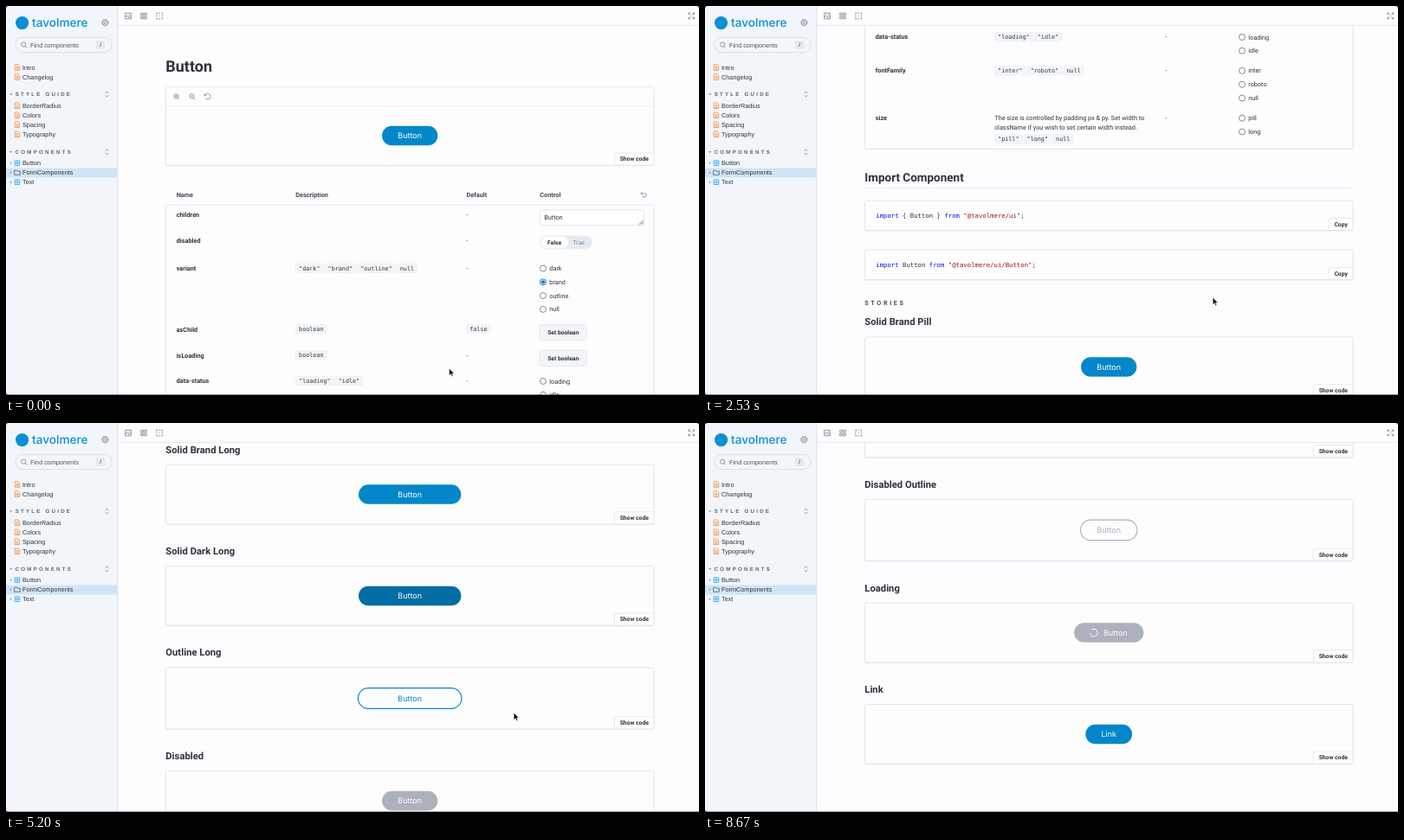
Recreate the animation shown at these times as an HTML page. Size 800 by 450 pixels, loop 8740 ms.

```html
<!DOCTYPE html>
<html lang="en">
<head>
<meta charset="utf-8">
<title>Component docs</title>
<style>
html, body { margin: 0; width: 100%; height: 100%; overflow: hidden; background: #fdfcfe; }
svg { display: block; width: 100vw; height: 100vh; text-rendering: geometricPrecision; }
text { white-space: pre; }
.r { font-family: Roboto, sans-serif; fill: #2e3438; }
.s { font-family: "Liberation Sans", Arial, sans-serif; fill: #2e3438; }
.m { font-family: "DejaVu Sans Mono", monospace; fill: #2e3438; }
.i { font-family: Inter, sans-serif; }
.b { font-weight: 700; }
.c { text-anchor: middle; }
.k { fill: #1010e8; }
.q { fill: #a31515; }
.ico { fill: none; stroke: #73828c; stroke-width: .8; }
</style>
</head>
<body>
<svg id="stage" viewBox="0 0 800 450" xmlns="http://www.w3.org/2000/svg">
  <g id="page"></g>
  <g id="frame"></g>
  <path id="cursor" d="M0 0V8.2L1.9 6.5L3.2 9.4L4.6 8.8L3.3 6H5.9Z" fill="#000" stroke="#fff" stroke-width=".6"/>
</svg>
<script>
const LOOP = 8740, STEPS = 131;
const BRAND = '#0487ca', DARK = '#026ea4', GREY = '#adb1bb';
const $ = id => document.getElementById(id);

// ---- drawing helpers: every text is placed by the middle of its capitals
const text = (x, cy, str, size, cls, extra = '') =>
  `<text x="${x}" y="${(cy + size * .355).toFixed(2)}" font-size="${size}" class="${cls}" ${extra}>${str}</text>`;
const rect = (x, y, w, h, fill, extra = '') =>
  `<rect x="${x}" y="${y}" width="${w}" height="${h}" fill="${fill}" ${extra}/>`;
const line = (x1, y1, x2, y2, color, w = .6) =>
  `<path d="M${x1} ${y1}L${x2} ${y2}" stroke="${color}" stroke-width="${w}"/>`;
const icon = (x, y, d, extra = '') =>
  `<path class="ico" transform="translate(${x} ${y})" d="${d}" ${extra}/>`;

const card = (y, h) =>
  rect(184.3, y + .9, 564, h, '#000', 'rx="2.2" opacity=".07"') +
  rect(184.5, y, 563.6, h, '#fdfdfe', 'rx="2.2" stroke="#d9dfe5" stroke-width=".7"');

function corner(bottom, label, x) {
  const y = bottom - 14.2;
  return `<path d="M748 ${y}H${x + 2}Q${x} ${y} ${x} ${y + 2}V${bottom}" fill="#fefefe" stroke="#dce2e7" stroke-width=".7"/>` +
    text((x + 748) / 2, bottom - 7.3, label, 6.75, 'r b c');
}

function pill(cy, w, fill, label = 'Button', outline = false) {
  const x = 466.2 - w / 2, h = outline ? 23.7 : 22.5;
  const box = outline
    ? rect(x, cy - h / 2, w, h, '#fdfdfe', `rx="${h / 2}" stroke="${fill}" stroke-width="1.15"`)
    : rect(x, cy - h / 2, w, h, fill, `rx="${h / 2}"`);
  return box + text(466.2, cy + .1, label, 9, 'i c', `fill="${outline ? fill : '#fff'}"`);
}

function tokens(x, cy, list) {
  return list.map(word => {
    const w = word.length * 4.064 + 7.6;
    const out = rect(x, cy - 5.3, w, 10.6, '#f2f5f8', 'rx="1.6" stroke="#e8edf1" stroke-width=".5"') +
      text(x + 3.8, cy, word, 6.75, 'm');
    x += w + 1.5;
    return out;
  }).join('');
}

const radios = (cy, list, on) => list.map((label, i) => {
  const y = cy + i * 15.8, sel = label === on;
  return `<circle cx="620" cy="${y + .3}" r="3.5" fill="#fff" stroke="${sel ? '#0a78d1' : '#666b70'}" stroke-width="${sel ? 1 : .8}"/>` +
    (sel ? `<circle cx="620" cy="${y + .3}" r="2.1" fill="#0a78d1"/>` : '') +
    text(627.3, y + .2, label, 7.31, 'r');
}).join('');

const setButton = cy =>
  rect(616.2, cy - 9, 54, 18, '#f3f5f9', 'rx="2" stroke="#dce3ea" stroke-width=".7"') +
  text(643.2, cy, 'Set boolean', 6.75, 'r b c');

const row = (cy, name, values, fallback = '-') =>
  text(196.7, cy, name, 7.31, 'r b') +
  (values ? tokens(334.3, cy, values) : '') +
  (fallback === '-' ? text(531.3, cy, '-', 7.31, 'r') : tokens(531.4, cy, [fallback]));

const quoted = words => words.map(w => w === 'null' ? w : `"${w}"`);

function table() {
  let out = [[196.7, 'Name'], [334.3, 'Description'], [531.5, 'Default'], [616.3, 'Control']]
    .map(([x, label]) => text(x, 218.2, label, 7.31, 'r b', 'fill-opacity=".9"')).join('');
  out += icon(736, 218, 'M-1.5 -2.8L-3.2 -1.1L-1.5 .6M-3 -1.1H1.3A1.9 1.9 0 0 1 1.3 2.8H-1.5');
  out += card(230, 333.4);
  out += row(241.3, 'children') +
    rect(616.3, 236, 120.4, 17.6, '#fff', 'rx="2" stroke="#d5dce2" stroke-width=".7"') +
    text(621.2, 244.8, 'Button', 7.31, 'r') +
    icon(735.6, 252.6, 'M-4.6 0L0 -4.6M-2.2 0L0 -2.2', 'style="stroke:#4a4f54"');
  out += row(271.3, 'disabled') + rect(616.2, 265.7, 60.6, 15.6, '#e4ecf2', 'rx="7.8"') +
    rect(616.8, 266.3, 32.8, 14.4, '#fff', 'rx="7.2" stroke="#dbe4ec" stroke-width=".5"') +
    text(633, 273.6, 'False', 6.75, 'r b c') +
    text(661, 273.6, 'True', 6.75, 'r c', 'style="fill:#77838c"');
  out += row(303.3, 'variant', quoted(['dark', 'brand', 'outline', 'null'])) +
    radios(303.2, ['dark', 'brand', 'outline', 'null'], 'brand');
  out += row(373.9, 'asChild', ['boolean'], 'false') + setButton(377.5);
  out += row(403.9, 'isLoading', ['boolean']) + setButton(407.5);
  out += row(433.8, 'data-status', quoted(['loading', 'idle'])) + radios(433.7, ['loading', 'idle']);
  out += row(472.7, 'fontFamily', quoted(['inter', 'roboto', 'null'])) + radios(472.6, ['inter', 'roboto', 'null']);
  out += row(527.5, 'size') + radios(527.4, ['pill', 'long']) +
    text(334.3, 527.5, 'The size is controlled by padding px &amp; py. Set width to', 7.31, 'r') +
    text(334.3, 538.6, 'className if you wish to set certain width instead.', 7.31, 'r') +
    tokens(334.3, 552, quoted(['pill', 'long', 'null']));
  return out;
}

const span = (cls, s) => `<tspan class="${cls}">${s}</tspan>`;
const codeCard = (y, code) =>
  card(y, 34.4) + text(197.3, y + 16.9, code, 7.31, 'm') + corner(y + 34.4, 'Copy', 720.3);

function stories() {
  const list = [
    ['Solid Brand Pill', 64.3, BRAND], ['Solid Dark Pill', 64.3, DARK], ['Outline Pill', 65.4, BRAND, 1],
    ['Solid Brand Long', 118.4, BRAND], ['Solid Dark Long', 118.4, DARK], ['Outline Long', 119.5, BRAND, 1],
    ['Disabled', 64.3, GREY], ['Disabled Outline', 65.4, GREY, 1], ['Loading', 80.2, GREY], ['Link', 53.7, BRAND]
  ];
  let y = 763.5;
  return list.map(([name, w, color, outline]) => {
    const top = y + 17.5, h = outline ? 71 : 68.8, cy = top + h / 2 + .1;
    let out = text(184.3, y, name, 11.25, 'r b') + card(top, h) + corner(top + h, 'Show code', 702.5);
    if (name === 'Loading') {
      out += pill(cy, w, color, '') + text(459.9, cy + .1, 'Button', 9, 'i', 'fill="#fff"') +
        `<g transform="translate(448.8 ${cy})"><path id="spin" d="M4.4 0A4.4 4.4 0 1 1 1.36 -4.18" fill="none" stroke="#fff" stroke-width=".85" stroke-linecap="round"/></g>`;
    } else {
      out += pill(cy, w, color, name === 'Link' ? name : 'Button', outline);
    }
    y += outline ? 119.7 : 117.4;
    return out;
  }).join('');
}

const lens = 'M1.9 1.9L3.9 3.9M2.6 0A2.6 2.6 0 1 1 -2.6 0A2.6 2.6 0 1 1 2.6 0';

function buildPage() {
  return text(184.3, 69.2, 'Button', 18, 'r b') +
    card(93.6, 90.7) + line(184.8, 116, 747.8, 116, '#e3e8ec') +
    icon(196.4, 104.3, lens + 'M-1.3 0H1.3M0 -1.3V1.3') +
    icon(214.4, 104.3, lens + 'M-1.3 0H1.3') +
    icon(232.8, 104.6, 'M-3.5 -3.2V-.9H-1.2M-3 -1.2A3.3 3.3 0 1 1 -2.6 2.1') +
    pill(150, 64.3, BRAND) + corner(184.3, 'Show code', 702.5) +
    table() +
    text(184.3, 596.2, 'Import Component', 13.5, 'r b') + line(184.3, 608.7, 748, 608.7, '#d9dfe5') +
    codeCard(623.2, span('k', 'import') + ' { Button } ' + span('k', 'from') + ' ' + span('q', '"@tavolmere/ui"') + ';') +
    codeCard(680.2, span('k', 'import') + ' Button ' + span('k', 'from') + ' ' + span('q', '"@tavolmere/ui/Button"') + ';') +
    text(184.3, 741.5, 'STORIES', 7.31, 'r b', 'letter-spacing="2.56" fill-opacity=".85"') +
    stories();
}

function buildFrame() {
  let out = rect(129, 0, 671, 22.4, '#fdfdfe') + line(129, 22.4, 800, 22.4, '#d9dfe5', .7) +
    icon(141, 11.5, 'M-3.3 -3.3H3.3V3.3H-3.3ZM-3.3 1.6L-1.2 -.6L2 3M.2 .8L1.5 -.4L3.3 1.3M1 -1.8H1.6') +
    icon(159, 11.5, 'M-3.3 -3.3H-.7V-.7H-3.3ZM.7 -3.3H3.3V-.7H.7ZM-3.3 .7H-.7V3.3H-3.3ZM.7 .7H3.3V3.3H.7Z') +
    icon(177.2, 11.5, 'M-3.4 -1.8V-3.4H-1.8M1.8 -3.4H3.4V-1.8M3.4 1.8V3.4H1.8M-1.8 3.4H-3.4V1.8M-.8 -3.4H.8M-.8 3.4H.8M-3.4 -.8V.8M3.4 -.8V.8M-.6 0H.6') +
    icon(791.3, 11.4, 'M-3.4 -1.4V-3.4H-1.4M1.4 -3.4H3.4V-1.4M3.4 1.4V3.4H1.4M-1.4 3.4H-3.4V1.4M-3.2 -3.2L-.8 -.8M3.2 -3.2L.8 -.8M3.2 3.2L.8 .8M-3.2 3.2L-.8 .8');
  out += rect(0, 0, 128.6, 450, '#f2f5fa') + line(128.8, 0, 128.8, 450, '#d3d9df', .8);

  out += `<circle cx="18.6" cy="19.6" r="7.6" fill="#0a8fd6"/>` +
    text(30, 19.6, 'tavolmere', 13.6, 'i', 'fill="#0a8fd6" font-weight="500"');
  out += icon(114.4, 19.2, 'M3.2 0A3.2 3.2 0 1 1 -3.2 0A3.2 3.2 0 1 1 3.2 0M1.3 0A1.3 1.3 0 1 1 -1.3 0A1.3 1.3 0 1 1 1.3 0') +
    icon(114.4, 19.2, 'M3.7 0A3.7 3.7 0 1 1 -3.7 0A3.7 3.7 0 1 1 3.7 0', 'stroke-dasharray="1.4 1.506"');

  out += rect(11, 36.4, 111, 17.2, '#f4f6fa', 'rx="8.6" stroke="#d3dae1" stroke-width=".7"') +
    icon(20.2, 44.6, lens) + text(28, 45, 'Find components', 7.31, 's', 'style="fill:#4b545b"') +
    rect(104, 40.3, 10.4, 9.4, '#e4e9ee', 'rx="1.8"') + text(109.2, 45, '/', 6.5, 's c');

  const doc = y => `<path transform="translate(13 ${y})" d="M-2.7 -3.3H1L2.7 -1.6V3.3H-2.7ZM-1.3 -.6H1.3M-1.3 .7H1.3M-1.3 2H1.3" fill="none" stroke="#f5842b" stroke-width=".75"/>`;
  [['Intro', 71], ['Changelog', 82], ['BorderRadius', 115.3], ['Colors', 126.3], ['Spacing', 137.3], ['Typography', 148.3]]
    .forEach(([label, y]) => out += doc(y) + text(19, y, label, 7.31, 's'));

  [['STYLE GUIDE', 102.1], ['COMPONENTS', 168.9]].forEach(([label, y]) => out +=
    `<path d="M4 ${y - .8}H7.4L5.7 ${y + 1.2}Z" fill="#8b969e"/>` +
    text(10.7, y, label, 6.2, 's b', 'letter-spacing="2.2" style="fill:#5c666d"') +
    icon(116.5, y, 'M-1.8 -1.2L0 -3L1.8 -1.2M-1.8 1.2L0 3L1.8 1.2'));

  out += rect(0, 187.5, 128.6, 11, '#d1e4f6');
  [['Button', 181.7], ['FormComponents', 192.7], ['Text', 203.7]].forEach(([label, y], i) => {
    out += `<path d="M4.9 ${y - 1.5}V${y + 1.5}L6.7 ${y}Z" fill="#8b969e"/>` + text(19, y, label, 7.31, 's');
    out += i === 1
      ? icon(13, y, 'M-3.3 -2.5H-.7L.2 -1.5H3.3V2.6H-3.3Z', 'style="stroke:#41606f"')
      : icon(13, y, 'M-2.8 -2.8H2.8V2.8H-2.8ZM-2.8 0H2.8M0 -2.8V2.8', 'style="stroke:#1ea7fd"');
  });
  return out + line(0, 449.6, 800, 449.6, '#77787c', .8) +
    `<path d="M0 0H3Q0 0 0 3ZM0 450V447Q0 450 3 450ZM800 0H797Q800 0 800 3Z" fill="#222"/>`;
}

$('page').innerHTML = buildPage();
$('frame').innerHTML = buildFrame();
const page = $('page'), cursor = $('cursor'), spin = $('spin');

// ---- motion
const scrollKeys = [[750, 0], [1330, 180], [2530, 398], [3400, 640], [4400, 917], [6070, 1266], [6930, 1475], [7400, 1519]];

const slope = i => (scrollKeys[i + 1][1] - scrollKeys[i][1]) / (scrollKeys[i + 1][0] - scrollKeys[i][0]);
// Harmonic mean of the neighbouring slopes keeps the curve monotone.
function tangent(i) {
  if (i === 0 || i === scrollKeys.length - 1) return 0;
  const a = slope(i - 1), b = slope(i);
  return 2 * a * b / (a + b);
}

function scrollAt(t) {
  const last = scrollKeys.length - 1;
  if (t <= scrollKeys[0][0]) return 0;
  if (t >= scrollKeys[last][0]) return scrollKeys[last][1];
  const i = scrollKeys.findIndex(k => k[0] > t) - 1;
  const [t0, a] = scrollKeys[i], [t1, b] = scrollKeys[i + 1];
  const d = t1 - t0, u = (t - t0) / d, v = 1 - u;
  return a * (1 + 2 * u) * v * v + tangent(i) * d * u * v * v +
    b * u * u * (3 - 2 * u) - tangent(i + 1) * d * u * u * v;
}

function ease(t, from, to) {
  const u = Math.min(1, Math.max(0, (t - from) / (to - from)));
  return u * u * (3 - 2 * u);
}

function draw(now) {
  // Each step is held, on a clock that ticks in hundredths of a second.
  const step = Math.floor(((now + 8) % LOOP) / LOOP * STEPS);
  const t = Math.floor(step * LOOP / STEPS / 10) * 10;
  page.setAttribute('transform', `translate(0 ${-scrollAt(t).toFixed(2)})`);
  const go = ease(t, 430, 960);
  const x = 511.6 + 74 * go + .6 * ease(t, 1400, 1900);
  const y = 419.2 - 74 * go - 8 * ease(t, 1400, 1900) - 2 * ease(t, 3500, 4200);
  cursor.setAttribute('transform', `translate(${x.toFixed(2)} ${y.toFixed(2)})`);
  cursor.setAttribute('visibility', t < 7500 ? 'visible' : 'hidden');
  spin.setAttribute('transform', `rotate(${(t * .36 % 360).toFixed(1)})`);
}

const start = performance.now();
function tick() {
  draw(performance.now() - start);
  requestAnimationFrame(tick);
}
tick();
</script>
</body>
</html>
```
